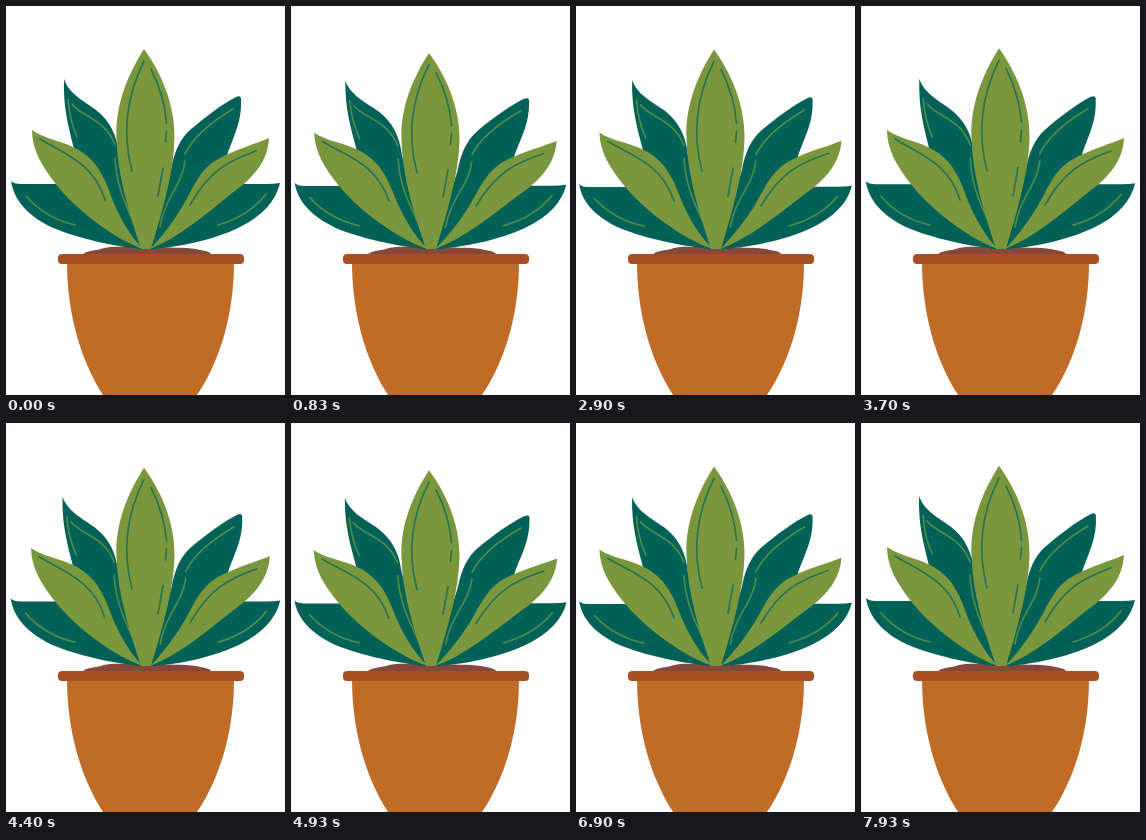
An HTML page that plays this animation: 279 by 389 pixels, repeating every 8.01 s.

```html
<!DOCTYPE html>
<html lang="en">
<head>
<meta charset="utf-8">
<title>Potted plant</title>
<style>
  html, body { margin: 0; width: 100%; height: 100%; overflow: hidden; background: #fff; }
  svg { display: block; width: 100vw; height: 100vh; }
  .dark { fill: #016157; }
  .light { fill: #7b973e; }
  .vein { fill: none; stroke-width: 1.7; stroke-linecap: round; }
  .dark + .vein { stroke: #4f894b; }
  .light + .vein { stroke: #2a7350; }
</style>
</head>
<body>
<svg viewBox="0 0 279 389">
  <path fill="#86483a" d="M76 249C80 244 90 245 98 242C110 239 124 242 142 241C162 242 178 241 190 243C198 245 204 245 206 249Z"/>
  <g id="lowLeft">
    <path class="dark" d="M5 175Q8 178 15 178H64L137 243C110 241 70 232 45 221C21 209 8 194 5 175Z"/>
    <path class="vein" d="M20 190Q39 212 69 219"/>
  </g>
  <g id="lowRight">
    <path class="dark" d="M274 177Q268 178 260 178H222L143 243C170 242 208 234 234 221C256 210 270 195 274 177Z"/>
    <path class="vein" d="M260 188Q243 210 212 219"/>
  </g>
  <g id="darkLeft">
    <path class="dark" d="M58 73C63 88 78 95 90 104C104 115 111 129 113 149L138 243H130C110 215 76 180 68 143C62 119 57 100 58 73Z"/>
    <path class="vein" d="M62 93C63 108 67 122 71 131M66 98C74 110 100 113 109 139M109 152C110 178 119 198 129 219"/>
  </g>
  <g id="darkRight">
    <path class="dark" d="M235 93Q235 89 230 91C216 98 198 112 184 124C174 133 168 146 165 164L142 243H150C178 218 213 183 222 146C229 127 236 114 235 93Z"/>
    <path class="vein" d="M227 103C207 115 187 131 179 148M179 155C176 180 159 191 154 221"/>
  </g>
  <g id="lightLeft">
    <path class="light" d="M26 124C37 132 52 134 67 141C93 153 100 176 107 195C114 212 124 230 137 243C108 233 69 203 49 177C36 160 26 144 26 124Z"/>
    <path class="vein" d="M34 133C58 148 88 157 99 194"/>
  </g>
  <g id="lightRight">
    <path class="light" d="M263 132C249 138 231 143 214 152C190 164 186 188 171 209C163 221 153 234 144 243C172 232 199 209 225 188C249 171 262 154 263 132Z"/>
    <path class="vein" d="M250 145C222 155 203 165 184 199"/>
  </g>
  <g id="center">
    <path class="light" d="M138 43C154 65 169 97 168.500 132C168 165 157 203 145 243H135C123 207 111 168 110.500 132C109 97 124 65 138 43Z"/>
    <path class="vein" d="M138 55C121 89 116 127 126 165M145 63C153 79 159 97 160.500 117M160.500 125L159.500 136M157 162L152 190"/>
  </g>
  <path fill="#c06c27" d="M61 256H228C228 304 216 352 191 389H97C73 352 61 304 61 256Z"/>
  <rect x="52" y="248" width="186" height="10" rx="4" fill="#a94f24"/>
</svg>
<script>
const LOOP = 8010, SWAY = 4000;
const rotate = (x, degrees) => d => `rotate(${degrees * d} ${x} 243)`;
const scale = (sx, sy) => d =>
  `translate(140 243) scale(${1 + sx * d} ${1 + sy * d}) translate(-140 -243)`;

// Each leaf: time of its widest spread in ms, and its pose for a given sway.
const leaves = [
  ['center', 1500, scale(0, -0.016)],
  ['darkLeft', 1700, rotate(140, -1.1)],
  ['darkRight', 1700, rotate(142, 1.05)],
  ['lightLeft', 1850, rotate(140, -1.4)],
  ['lightRight', 1850, rotate(142, 1.45)],
  ['lowLeft', 2000, scale(0.012, -0.04)],
  ['lowRight', 2000, scale(0.012, -0.036)]
].map(([id, peak, pose]) => ({ node: document.getElementById(id), peak, pose }));

const wave = t => Math.cos(2 * Math.PI * t / SWAY);

// Twenty drawings a second, held alternately for 30 and 70 ms.
function stepped(ms) {
  const t = ms % LOOP;
  const step = 2 * Math.floor(t / 100) + (t % 100 >= 30 ? 1 : 0);
  return Math.min(step, 159) * 50;
}

function draw(ms) {
  const t = stepped(ms);
  for (const { node, peak, pose } of leaves)
    node.setAttribute('transform', pose(wave(t - peak) - wave(peak)));
}

const start = performance.now();
function tick() {
  draw(performance.now() - start);
  requestAnimationFrame(tick);
}
tick();
</script>
</body>
</html>
```
